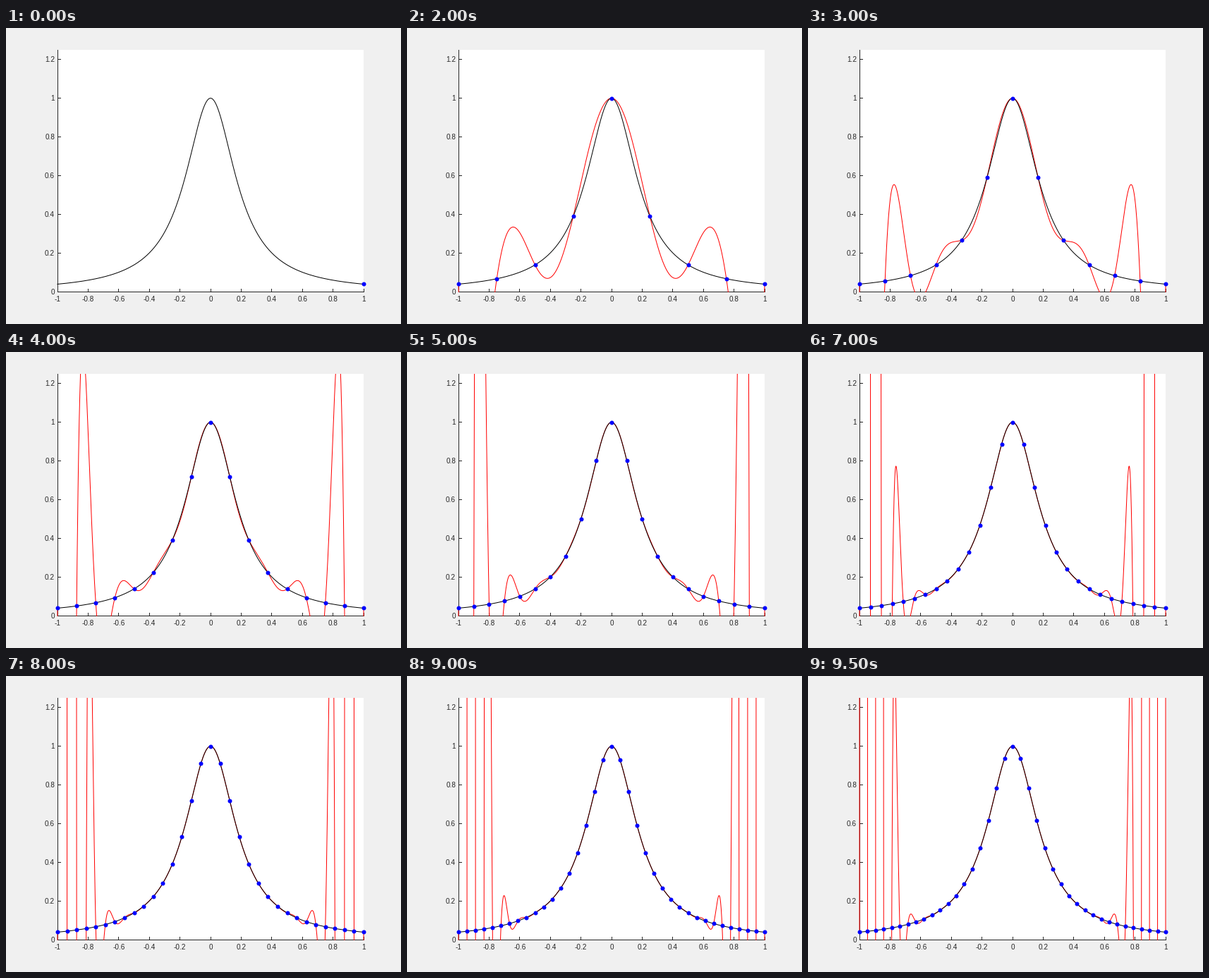
A matplotlib script for the animation above (10 s loop, 560 px wide and 420 px high).

```python
import math

import matplotlib.pyplot as plt
import numpy as np
from matplotlib.animation import FuncAnimation
from matplotlib.patches import Rectangle

W, H, DPI = 560, 420, 100
PX = 72 / DPI  # points per pixel
LEFT, RIGHT, TOP, BOTTOM = 73, 507, 31, 374
Y_MAX = 1.25
INK = "#262626"


def to_x(x):
    return LEFT + (np.asarray(x) + 1) / 2 * (RIGHT - LEFT)


def to_y(y):
    return BOTTOM - np.asarray(y) / Y_MAX * (BOTTOM - TOP)


def runge(x):
    return 1 / (1 + 25 * x**2)


def interpolate(nodes, x):
    """Barycentric interpolation of the Runge function on equispaced nodes."""
    n = len(nodes) - 1
    weights = np.array([(-1.0) ** j * math.comb(n, j) for j in range(n + 1)])
    diff = x[:, None] - nodes
    hit = np.abs(diff) < 1e-12
    terms = weights / np.where(hit, 1, diff)
    values = terms @ runge(nodes) / terms.sum(axis=1)
    return np.where(hit.any(axis=1), runge(x), values)


fig = plt.figure(figsize=(W / DPI, H / DPI), dpi=DPI, facecolor="#f0f0f0")
ax = fig.add_axes([0, 0, 1, 1])
ax.set(xlim=(0, W), ylim=(H, 0))
ax.axis("off")

ax.add_patch(Rectangle((LEFT, TOP), RIGHT - LEFT, BOTTOM - TOP,
                       fc="white", ec="none", zorder=0))
clip = Rectangle((LEFT - 1, TOP), RIGHT - LEFT + 2, BOTTOM - TOP + 0.5,
                 fc="none", ec="none")
ax.add_patch(clip)


def rule(x, y, w, h):
    ax.add_patch(Rectangle((x, y), w, h, fc=INK, ec="none", lw=0, zorder=1))


def label(x, y, value, align):
    ax.text(x, y, f"{value:g}", ha=align, va="baseline", color=INK,
            family="Liberation Sans", size=10 * PX)


rule(LEFT, TOP, 1, BOTTOM - TOP + 1)
rule(LEFT, BOTTOM, RIGHT - LEFT + 1, 1)
for k in range(-5, 6):
    px = float(to_x(k / 5))
    rule(math.floor(px), BOTTOM - 4, 1, 4)
    label(px, 388, k / 5, "center")
for k in range(7):
    py = float(to_y(k / 5))
    rule(LEFT, math.floor(py), 5, 1)
    label(69, py + 3.6, k / 5, "right")

xs = np.linspace(-1, 1, 1001)
poly, = ax.plot([], [], color="red", lw=PX, zorder=2, snap=False)
curve, = ax.plot(to_x(xs), to_y(runge(xs)), color="black", lw=PX,
                 zorder=3, snap=False)
for line in (poly, curve):
    line.set_clip_path(clip)
dots, = ax.plot([], [], "o", color="blue", ms=6 * PX, mew=0,
                zorder=4, snap=False, clip_on=False)


def update(frame):
    degree = 2 * frame
    if degree:
        nodes = np.linspace(-1, 1, degree + 1)
        poly.set_data(to_x(xs), to_y(interpolate(nodes, xs)))
    else:
        nodes = np.array([1.0])
        poly.set_data([], [])
    dots.set_data(to_x(nodes), to_y(runge(nodes)))
    return poly, dots


anim = FuncAnimation(fig, update, frames=20, interval=500,
                     repeat=True, repeat_delay=0)
plt.show()
```
